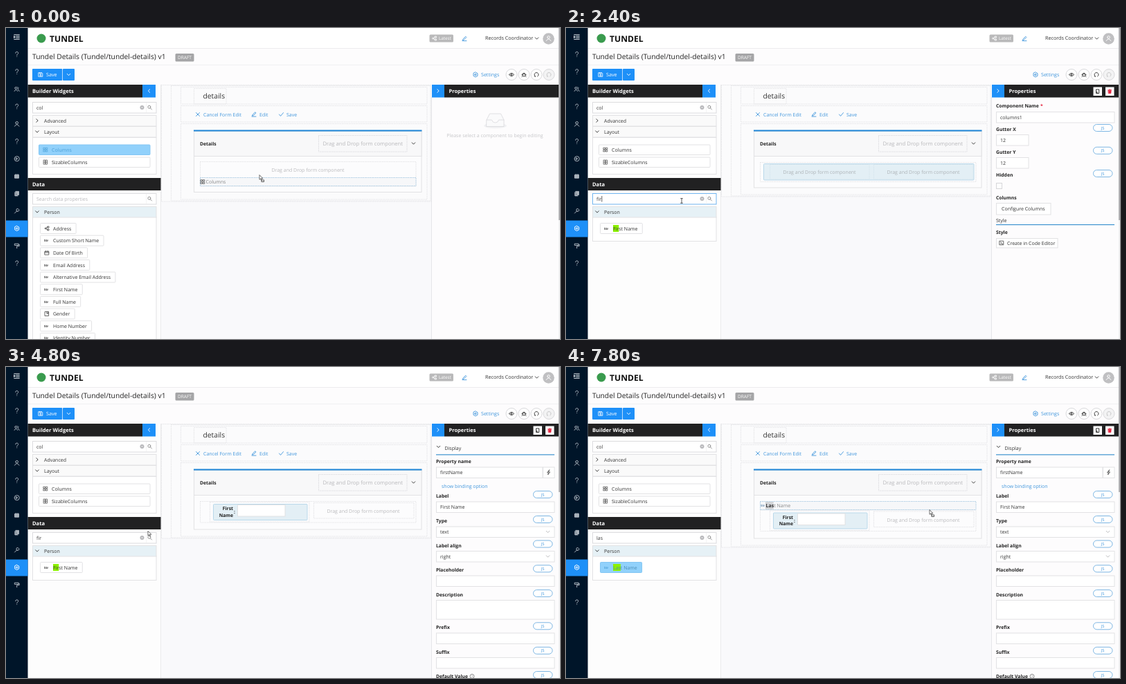
Write an HTML page that moves like this. It is 800 px wide and 450 px high and loops after 8 s.

```html
<!DOCTYPE html>
<html lang="en">
<head>
<meta charset="utf-8">
<title>Form designer</title>
<style>
html, body { margin: 0; width: 100%; height: 100%; overflow: hidden; background: #fdfcfd; }
svg { display: block; width: 100%; height: 100%; }
text { font-family: "Open Sans", "Noto Sans", sans-serif; text-rendering: geometricPrecision; white-space: pre; }
</style>
</head>
<body>
<svg id="stage" viewBox="0 0 800 450"></svg>
<script>
const LOOP = 8000, STEP = 200;
const BLUE = '#1e90f8', LINK = '#4096dc', INK = '#333', BLACK = '#212122', LINE = '#e2e2e4', FAINT = '#b9b9bc';
const DROP_TEXT = 'Drag and Drop form component';
const stage = document.getElementById('stage');
const pen = document.createElement('canvas').getContext('2d');

// ---- drawing helpers, each returns SVG markup ----
// box edges sit on pixel centres when stroked
function box(x1, y1, x2, y2, fill = 'none', stroke = '', extra = '') {
  const o = stroke ? .5 : 0;
  return `<rect x="${x1 + o}" y="${y1 + o}" width="${x2 - x1 - o}" height="${y2 - y1 - o}" fill="${fill}" ${stroke && `stroke="${stroke}"`} ${extra}/>`;
}
const text = (x, y, s, fill = INK, size = 7, extra = '') =>
  `<text x="${x}" y="${y}" fill="${fill}" font-size="${size}" ${extra}>${s}</text>`;
const bold = (x, y, s, fill = '#222', size = 6.8, extra = '') => text(x, y, s, fill, size, 'font-weight="700" ' + extra);
const centred = (x, y, s, fill, size) => text(x, y, s, fill, size, 'text-anchor="middle"');
const icon = (x, y, d, stroke = INK, width = .9, fill = 'none') =>
  `<path transform="translate(${x} ${y})" d="${d}" fill="${fill}" stroke="${stroke}" stroke-width="${width}" stroke-linecap="round" stroke-linejoin="round"/>`;
const disc = (x, y, r, fill, stroke = 'none') => `<circle cx="${x}" cy="${y}" r="${r}" fill="${fill}" stroke="${stroke}"/>`;
const dashed = (x1, y1, x2, y2, fill = 'none', stroke = '#e4e4e7') => box(x1, y1, x2, y2, fill, stroke, 'stroke-dasharray="1.5 1"');
const widthOf = (s, size = 7) => (pen.font = `${size}px "Open Sans", "Noto Sans", sans-serif`, pen.measureText(s).width);

const SHAPES = {
  down: 'M-2.3 -1.2L0 1.2L2.3 -1.2', right: 'M-1.2 -2.3L1.2 0L-1.2 2.3', left: 'M1.2 -2.3L-1.2 0L1.2 2.3',
  cross: 'M-2.5 -2.5L2.5 2.5M2.5 -2.5L-2.5 2.5', check: 'M-3 0L-1 2.4L3 -2.4',
  pencil: 'M-2 1.2L1.7 -2.8L2.9 -1.6L-.8 2.2L-2.3 2.5ZM-3 3.6H3',
  lens: 'M.8 .8L3 3M1.4 -.7A2 2 0 1 1 -2.6 -.7A2 2 0 1 1 1.4 -.7',
  grid: 'M-2.8 -2.8H-.6V-.6H-2.8ZM.6 -2.8H2.8V-.6H.6ZM-2.8 .6H-.6V2.8H-2.8ZM.6 .6H2.8V2.8H.6Z',
  columns: 'M-2.5 -3H-.5V3H-2.5ZM.5 -3H2.5V3H.5ZM-2.5 0H-.5M.5 0H2.5',
  share: 'M-2.8 0A1 1 0 1 0 -.8 0A1 1 0 1 0 -2.8 0M-1 -.5L1 -1.8M-1 .5L1 1.8M1 -2.9H3V-1H1ZM1 1H3V2.9H1Z',
  calendar: 'M-2.8 -2H2.8V2.8H-2.8ZM-2.8 -.4H2.8M-1.4 -3V-1.6M1.4 -3V-1.6',
  book: 'M-2.6 -3H2.6V3H-2.6ZM0 -3V0L1 -.8L2 0V-3',
  query: 'M-1.9 -1.7A1.9 1.9 0 1 1 .8 0Q0 .5 0 1.4M0 3.2V3.3',
  people: 'M-2.8 -1.5A1.5 1.5 0 1 0 .2 -1.5A1.5 1.5 0 1 0 -2.8 -1.5M-3.6 3Q-1.2 -1.4 1 3M1.3 -3Q3.4 -2 1.4 0L3.5 3',
  person: 'M-1.8 -1.6A1.8 1.8 0 1 0 1.8 -1.6A1.8 1.8 0 1 0 -1.8 -1.6M-3.2 3.4Q0 -2 3.2 3.4',
  play: 'M-3.6 0A3.6 3.6 0 1 0 3.6 0A3.6 3.6 0 1 0 -3.6 0M-.8 -1.4L1.3 0L-.8 1.4Z',
  pages: 'M-1.5 -3.2H2.8V2H-1.5ZM-2.8 -1.8V3.3H1.4',
  wrench: 'M-3.2 3.2L.5 -.5M3 -2.2A2 2 0 1 1 1.6 -3.3',
  gear: 'M-1.2 0A1.2 1.2 0 1 0 1.2 0A1.2 1.2 0 1 0 -1.2 0M0 -3.5L3 -1.8V1.8L0 3.5L-3 1.8V-1.8Z',
  roller: 'M-3 -3H2.4V-.8H-3ZM2.4 -2H3.5V.4H0V3.5',
  menu: 'M-3.8 -3.2H3.8M-.8 -1H3.8M-.8 1.1H3.8M-3.8 3.3H3.8M-3.6 -1.2L-2 0L-3.6 1.2Z',
  eye: 'M-3.5 0Q0 -4.5 3.5 0Q0 4.5 -3.5 0M-1 0A1 1 0 1 0 1 0A1 1 0 1 0 -1 0',
  bug: 'M-1.8 -1.2H1.8V1Q0 4.5 -1.8 1ZM-1.3 -1.2Q0 -4.2 1.3 -1.2M-3.2 .4H-1.8M1.8 .4H3.2M-3 3L-1.6 2M3 3L1.6 2',
  undo: 'M-1.6 2.6A3 3 0 1 1 1.6 2.6M-1.6 2.6L-2.9 2.4',
  disk: 'M-2.8 -2.8H1.8L2.8 -1.8V2.8H-2.8ZM-1.4 -2.8V-1.2H1V-2.8M-1 1A1 1 0 1 0 1 1A1 1 0 1 0 -1 1',
  bin: 'M-2 -1.2H2L1.6 2.8H-1.6ZM-2.6 -2H2.6M-.8 -2.8H.8',
  copy: 'M-1.8 -2.8H2V2.8H-1.8ZM-.6 2.8V1H-1.8',
  bolt: 'M1 -3.5L-2 .4H0L-1 3.5L2 -.6H.2Z',
  code: 'M-2.8 -2.8H2.8V2.8H-2.8ZM-1.4 -1.2L0 0L-1.4 1.2M.4 1.4H1.6'
};
const sym = (name, x, y, color, width, fill) => icon(x, y, SHAPES[name], color, width, fill);
const strTag = (x, y, color = INK) => bold(x, y + 1.6, 'Str', color, 4.4);
const binButton = (x, y) => box(x - 6, y - 6, x + 6, y + 6, '#fff', '#999') + sym('bin', x, y, '#e5243f', .8, '#e5243f');

// ---- timeline ----
const PATH = [[0, 366, 213], [400, 360, 217], [1000, 324, 228], [1600, 167, 250], [2400, 167, 250], [3000, 78, 290],
  [3200, 78, 291], [4000, 362, 211], [4400, 362, 211], [5000, 150, 247], [5400, 130, 248], [5800, 6, 255], [6000, 6, 255],
  [6600, 212, 342], [7000, 86, 291], [7200, 82, 290], [7800, 525, 207]];
const TYPED = [[0, ''], [1800, 'f'], [2000, 'fi'], [2200, 'fir'], [5200, 'l'], [5400, 'la'], [5600, 'las']];
const within = (t, a, b) => t >= a && t < b;

function pointerAt(t) {
  const i = PATH.findIndex(p => p[0] > t);
  if (i < 0) return PATH.at(-1).slice(1);
  const [t0, x0, y0] = PATH[i - 1], [t1, x1, y1] = PATH[i];
  const k = (t - t0) / (t1 - t0), e = k * k * (3 - 2 * k);
  return [x0 + (x1 - x0) * e, y0 + (y1 - y0) * e];
}

function stateAt(t) {
  const [x, y] = pointerAt(t);
  const dragging = t < 400 || within(t, 3200, 4400) || t >= 7200;
  const overForm = x > 270 && x < 605 && y > 85 && y < 245;
  return {
    t, x, y, dragging, overForm, preview: dragging && overForm,
    phase: t < 400 ? 'empty' : t < 4400 ? 'columns' : 'field',
    query: TYPED.findLast(s => s[0] <= t)[1],
    focused: within(t, 1600, 2600) || within(t, 5000, 7200),
    reports: within(t, 5600, 6200)
  };
}

// ---- page parts ----
function sidebar(s) {
  const names = ['query', 'query', 'people', 'query', 'person', 'query', 'play', 'calendar', 'pages', 'wrench', 'gear', 'roller', 'query'];
  const filled = ['calendar', 'pages'];
  return box(0, 0, 31.5, 450, '#001529') + (s.reports ? box(0, 228, 31.5, 251, '#45a8fb') : '') + box(0, 278.5, 31.5, 302.5, BLUE) +
    sym('menu', 15.5, 13, '#dfe4ea', 1) +
    names.map((n, i) => {
      const color = n === 'gear' || (n === 'pages' && s.reports) ? '#fff' : '#a9b1ba';
      return sym(n, 15.7, 38 + i * 25.2, color, 1, filled.includes(n) ? color : 'none');
    }).join('');
}

function header() {
  const round = [['eye', 730], ['bug', 748], ['undo', 766], ['undo', 784]];
  return box(31.5, 0, 800, 29, '#fff') + box(31.5, 29, 800, 30, '#ececee') +
    disc(51, 15, 6.5, '#3a9b4e') + bold(63, 19.5, 'TUNDEL', '#111', 12.1) +
    box(611.5, 9.5, 646, 20.5, '#b9b9ba', '', 'rx="1.5"') + sym('share', 618.5, 15, '#fff', .8) + text(625, 17.4, 'Latest', '#fff', 6.3) +
    sym('pencil', 662, 15, LINK) + text(692, 17.3, 'Records Coordinator', INK, 7.2) + sym('down', 766.5, 15) +
    disc(783.5, 15.5, 8.3, '#c0c0c2') + sym('person', 783.5, 15, '#fff', 1) +
    text(38, 45, 'Tundel Details (Tundel/tundel-details) v1', '#222', 10.3) +
    box(244.5, 37, 271.5, 48.5, '#a5a5a7', '', 'rx="1.5"') + centred(258, 45, 'DRAFT', '#fff', 6.5) +
    box(31.5, 53, 800, 54, '#f0f0f2') +
    box(38, 59, 81.3, 76, BLUE, '', 'rx="1"') + sym('disk', 50, 67.5, '#fff', .8) + text(58, 70.2, 'Save', '#fff', 7.2) +
    box(82, 59, 99, 76, BLUE, '', 'rx="1"') + sym('down', 90.5, 67.5, '#fff') +
    sym('gear', 678, 67.5, LINK) + text(686, 70.4, 'Settings', LINK, 7.1) +
    round.map(([n, x], i) => disc(x, 67.5, 8, i === 3 ? '#f3f3f4' : '#fff', '#d9d9dc') + sym(n, x, 67.5, i === 3 ? '#c4c4c6' : '#333')).join('');
}

function searchBox(y, value, focused) {
  return box(38, y, 217, y + 16, '#fff', focused ? '#6fb4ef' : '#dcdcdf') +
    (value ? text(44, y + 10.7, value) + disc(196.5, y + 8, 3, '#b5b5b8') + icon(196.5, y + 8, 'M-1 -1L1 1M1 -1L-1 1', '#fff', .6)
      : text(44, y + 10.7, 'Search data properties', FAINT)) +
    (focused ? box(44.5 + widthOf(value), y + 4, 45.2 + widthOf(value), y + 12.5, '#222') : '') +
    box(202, y + 1, 202.6, y + 16, '#ebebed') + sym('lens', 207.5, y + 8, '#888');
}

const rowHeader = (y, label, shape, fill) => box(38, y, 217, y + 16, fill, LINE) + sym(shape, 45, y + 8) + text(55, y + 10.7, label);

function widgets(s) {
  const tile = (y, label, shape, active) => box(47, y, 208, y + 15, active ? '#91d1fb' : '#fff', active ? '#84c6f3' : LINE, 'rx="1"') +
    sym(shape, 57, y + 7.6, active ? '#55a6dc' : '#555', .8) + text(66, y + 10.2, label, active ? '#4b9fd6' : INK);
  return box(31.5, 82, 223, 450, '#fdfdfd') + box(223, 82, 224, 450, '#ebebed') +
    box(31.5, 82, 197, 100.5, BLACK) + bold(38, 94.3, 'Builder Widgets', '#fff', 7.6) +
    box(197, 82, 216, 100.5, BLUE) + sym('left', 206.5, 91, '#fff') + searchBox(107, 'col', false) +
    rowHeader(126, 'Advanced', 'right', '#fafafa') + rowHeader(142, 'Layout', 'down', '#fafafa') +
    box(38, 158, 217, 211.5, '#fff', LINE) +
    tile(168.5, 'Columns', 'grid', s.phase === 'empty') + tile(186.5, 'SizableColumns', 'columns', false);
}

const FIELDS = ['Address', 'Custom Short Name', 'Date Of Birth', 'Email Address', 'Alternative Email Address', 'First Name',
  'Full Name', 'Gender', 'Home Number', 'Identity Number', 'Last Name'];
const FIELD_ICONS = { Address: 'share', 'Date Of Birth': 'calendar', Gender: 'book' };

function dataPanel(s) {
  const shown = FIELDS.filter(f => f.toLowerCase().includes(s.query));
  const items = shown.map((name, i) => {
    const y = 290 + i * 17.65, active = s.dragging && s.t >= 7200;
    const at = name.toLowerCase().indexOf(s.query), shape = FIELD_ICONS[name];
    const from = 68 + widthOf(name.slice(0, at)), to = from + widthOf(name.slice(at, at + s.query.length));
    return box(49, y - 8, 74.8 + widthOf(name), y + 7.5, active ? '#91d1fb' : '#fff', active ? '#84c6f3' : LINE, 'rx="1"') +
      (shape ? sym(shape, 59, y, '#444', .8) : strTag(55, y, active ? '#4b9fd6' : INK)) +
      (s.query ? box(from, y - 5, to, y + 5, '#8df200') : '') + text(68, y + 2.6, name, active ? '#4b8db8' : INK);
  }).join('');
  return box(31.5, 217, 223.5, 235, BLACK) + bold(38, 229, 'Data', '#fff', 7.6) + searchBox(239, s.query, s.focused) +
    box(38, 273, 217, 290 + (shown.length - 1) * 17.65 + 18.5, '#fff', LINE) + rowHeader(258, 'Person', 'down', '#e6f1f6') + items;
}

// outline showing where a dragged component will land
function landing(x1, y, x2, label, mark) {
  const tag = mark ? box(x1 + 8, y + 1, x1 + 8 + widthOf(label.slice(0, mark)) + .8, y + 12, '#d3d5d8') +
    strTag(x1 + 1, y + 6.5, '#6b8fae') : sym('grid', x1 + 4, y + 6.5, '#555', .8);
  return dashed(x1, y, x2, y + 12.5, '#f6f7f9', '#a9cae2') + tag +
    text(x1 + 8.5, y + 9, mark ? `<tspan font-weight="700" fill="#333">${label.slice(0, mark)}</tspan>${label.slice(mark)}` : label, '#888');
}

function formBody(s) {
  const select = ['#e3eff5', '#b9d8ea', 'rx="1"'];
  if (s.phase === 'empty') {
    return dashed(280, 193, 592, 229) + centred(436, 208, DROP_TEXT, FAINT) + landing(280, 216, 592, 'Columns', 0);
  }
  if (s.phase === 'columns') {
    const bottom = s.preview ? 232.5 : 220;
    return dashed(280, 194, 592, bottom + 2.5) + box(285, 196, 589, bottom, ...select) +
      dashed(294, 197, 438, bottom - 1, 'none', '#d5e4ec') + dashed(444, 197, 588, bottom - 1, 'none', '#d5e4ec') +
      centred(366, 211, DROP_TEXT, '#adb3b7') + centred(516, 211, DROP_TEXT, '#adb3b7') +
      (s.preview ? landing(294, 219, 438, 'First Name', 3) : '');
  }
  const dy = s.preview ? 12.5 : 0;
  return `<g transform="translate(0 ${dy})">` + dashed(280, 194, 592, 225) + dashed(294, 195, 438, 224) +
    box(299, 198, 435, 221.5, ...select) +
    bold(328, 207, 'First', '#222', 6.8, 'text-anchor="end"') + bold(328, 216.8, 'Name', '#222', 6.8, 'text-anchor="end"') + bold(329, 212, ':') +
    box(334, 199, 403, 216, '#fff', LINE) + dashed(444, 196, 589, 219) + centred(516, 211, DROP_TEXT, FAINT) + '</g>' +
    (s.preview ? landing(280, 194, 592, 'Last Name', 3) : '');
}

function form(s) {
  const [card, outer] = s.phase === 'empty' ? [237.5, 251] : s.phase === 'columns' ? (s.preview ? [243, 257] : [231, 244])
    : (s.preview ? [248, 261] : [235, 248]);
  let out = box(224, 82, 614, 450, '#f9f9fb') + dashed(224, 82, 614, outer, '#fbfbfc') + dashed(238, 83, 613, outer - 1) +
    dashed(252, 85, 608, 110) + dashed(252, 112, 608, 136) + dashed(252, 138, 608, outer - 3) +
    dashed(271, 87, 318, 110) + text(284.5, 102, 'details', '#333', 10.3) +
    sym('cross', 277, 125, LINK) + text(285, 127.8, 'Cancel Form Edit', LINK) +
    sym('pencil', 358, 124.5, LINK) + text(366, 127.8, 'Edit', LINK) +
    sym('check', 397.5, 125, LINK) + text(405, 127.8, 'Save', LINK) +
    box(271, 148, 600, card, '#fcfcfd', LINE) + box(271, 149, 600, 185.5, '#f8f8f9', LINE) + box(271, 147.5, 600.5, 149.5, '#1f86d8') +
    bold(280, 170, 'Details') + dashed(451, 155, 579, 179, 'none', '#dcdce0') + text(457.5, 170.2, DROP_TEXT, FAINT, 7.7) +
    sym('down', 588.5, 167) + formBody(s);
  if (s.overForm && !s.dragging) {
    out += box(230, 84, 235.5, outer - 1, '#d4d4d6') + box(244, 138, 249, outer - 4, '#d4d4d6') + box(263, 148, 268, card, '#d4d4d6') +
      binButton(603, 94) + binButton(600, 148) + binButton(591, 157);
  }
  return out;
}

// ---- properties panel ----
const pill = y => box(761, y - 5.5, 789, y + 5, '#fff', '#7db6e3', 'rx="5"') + centred(775, y + 2.1, 'JS', LINK, 5.8);
const label = (y, s, js = true) => bold(621, y, s) + (js ? pill(y - 4.5) : '');
const input = (y, value = '', right = 792, height = 16) => box(621, y, right, y + height, '#fff', LINE) + text(627, y + 10.8, value);
const dropDown = (y, value) => input(y, value) + sym('down', 782.5, y + 8, '#b5b5b8');

function columnProps() {
  return label(115, 'Component Name', false) + bold(685, 115, '*', '#e5243f') + input(121, 'columns1') +
    label(149, 'Gutter X') + input(154, '12', 668) + label(181.8, 'Gutter Y') + input(187, '12', 668) +
    label(215, 'Hidden') + box(621, 224, 629.5, 232.5, '#fff', '#d6d6d9') +
    label(248, 'Columns', false) + box(621, 253, 700, 270, '#fff', LINE) + text(629, 264.2, 'Configure Columns') +
    text(621, 281, 'Style') + box(621, 284, 792, 285.2, '#3d92cf') + label(298, 'Style', false) +
    box(621, 304, 710, 318, '#fff', LINE) + sym('code', 629, 311, '#444', .8) + text(637, 313.8, 'Create in Code Editor');
}

function fieldProps() {
  return sym('down', 624.5, 115.5) + text(633.5, 119.5, 'Display') + box(621, 126.3, 792, 127.5, '#3d92cf') +
    label(139, 'Property name', false) + input(144.5, 'firstName', 775) + box(775, 144.5, 792, 160.5, '#fff', LINE) + sym('bolt', 783.5, 152.5, '#444', .8) +
    text(629, 175, 'show binding option', LINK) +
    label(189, 'Label') + input(194.5, 'First Name') + label(225, 'Type') + dropDown(230.5, 'text') +
    label(260.5, 'Label align') + dropDown(266, 'right') + label(296.3, 'Placeholder') + input(301.5) +
    label(332, 'Description') + input(337, '', 792, 28) + label(379.3, 'Prefix') + input(384.5) +
    label(414.8, 'Suffix') + input(420) + label(450, 'Default Value') + disc(673, 447.5, 3, 'none', '#888') + centred(673, 449.5, '?', '#777', 5);
}

function emptyProps() {
  return `<ellipse cx="706.5" cy="141.5" rx="16.5" ry="3.8" fill="#f1f1f3"/>` +
    icon(706.5, 133, 'M-12.5 0L-8 -9H8L12.5 0V9.5H-12.5ZM-12.5 0H-5Q-4 4 0 4Q4 4 5 0H12.5', '#d9d9dc', .8, '#fafafb') +
    centred(706, 158, 'Please select a component to begin editing', '#c6c6c9');
}

function properties(s) {
  const empty = s.phase === 'empty';
  return box(614, 82, 800, 450, '#fdfcfd') + box(614, 100, 615, 450, '#e6e6e9') +
    box(615, 82, 633, 100.5, BLUE) + sym('right', 624, 91, '#fff') + box(633, 82, 800, 100.5, BLACK) + bold(639.5, 94.2, 'Properties', '#fff', 7.5) +
    (empty ? emptyProps() : box(761.5, 85.5, 774, 98, '#fff') + sym('copy', 767.7, 91.7, '#222') +
      box(779, 85.5, 791.5, 98, '#fff') + sym('bin', 785.2, 91.7, '#e5243f', .8, '#e5243f') +
      (s.phase === 'columns' ? columnProps() : fieldProps())) +
    box(798, 0, 800, 450, '#f1f1f2') + box(798, 0, 800, s.phase === 'field' ? 181 : 278, '#b2b2b5');
}

function tooltip() {
  return icon(37, 239.5, 'M0 0L4.5 -3.5V3.5Z', 'none', 0, '#3a3a3c') + box(41, 231, 74.5, 248.5, '#3a3a3c', '', 'rx="1.5"') +
    text(45.5, 242.5, 'Reports', '#fff', 7);
}

function pointer({ x, y, t, dragging }) {
  if (within(t, 1600, 2600) || within(t, 5000, 5400)) return icon(x, y, 'M-1.4 -3.3H1.4M0 -3.3V3.3M-1.4 3.3H1.4', '#333', .8);
  return icon(x, y, 'M0 0V6.3L1.5 5L2.6 7.3L3.6 6.8L2.5 4.6H4.5Z', '#333', .7, '#fff') +
    (dragging ? box(x + 2.5, y + 6.5, x + 6.5, y + 9.5, '#fff', '#333', 'stroke-width=".8"') : '');
}

function render(t) {
  const s = stateAt(t);
  stage.innerHTML = header() + widgets(s) + dataPanel(s) + form(s) + properties(s) + sidebar(s) + (s.reports ? tooltip() : '') + pointer(s);
}

let last = -1;
function tick() {
  const t = Math.floor(performance.now() % LOOP / STEP) * STEP;
  if (t !== last) render(last = t);
  requestAnimationFrame(tick);
}
tick();
</script>
</body>
</html>
```
